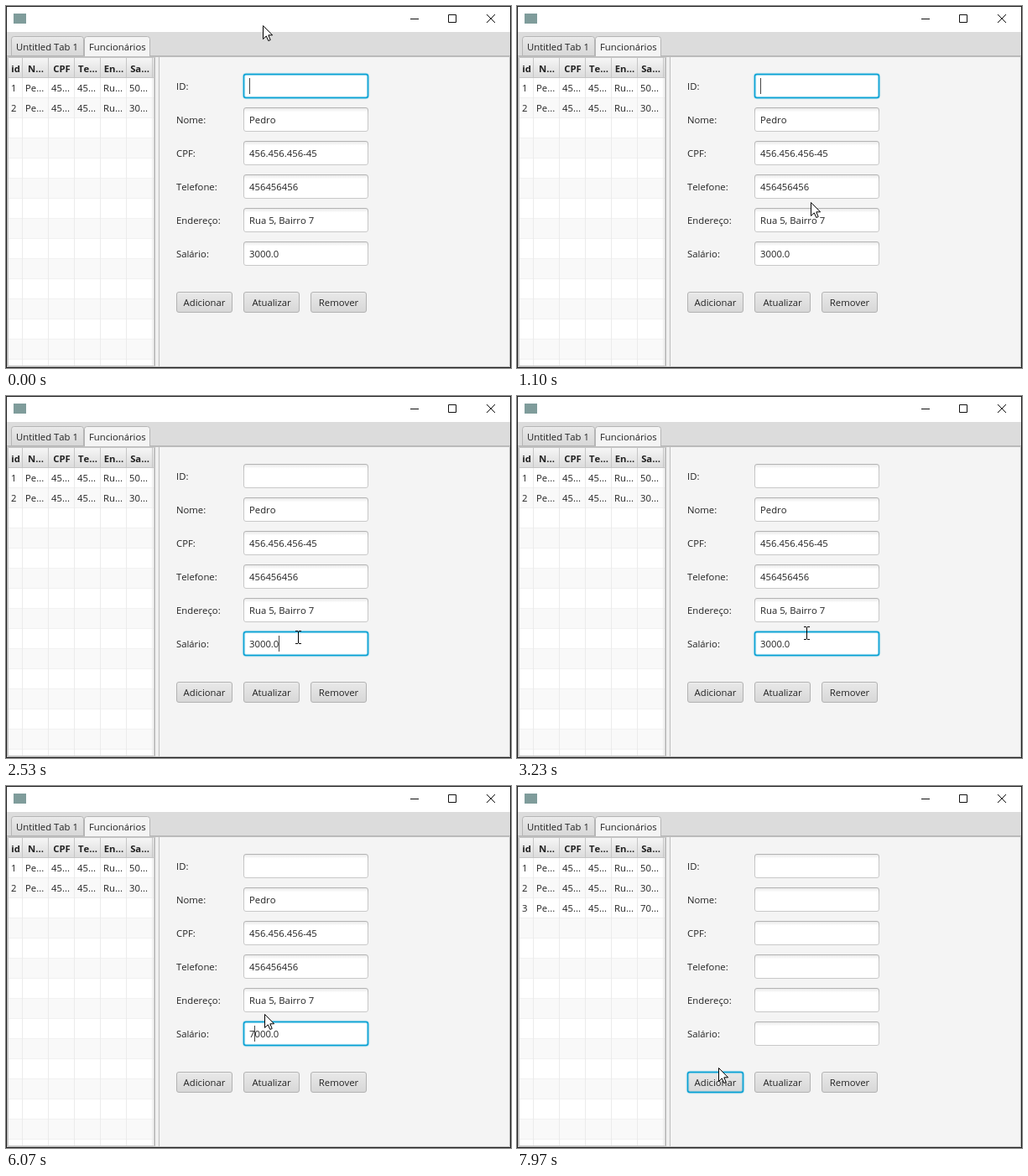
An HTML page for the animation above (8000 ms loop, 602 px wide and 432 px high).

```html
<!DOCTYPE html>
<html lang="pt">
<head>
<meta charset="utf-8">
<title>Funcionários</title>
<style>
  html, body { margin: 0; width: 100%; height: 100%; overflow: hidden; }
  svg { display: block; width: 100%; height: 100%; }
  text { font: 11.3px "Open Sans", "Noto Sans", sans-serif; font-kerning: none; fill: #222; white-space: pre; }
  .bold { font-weight: 700; }
  .mid { text-anchor: middle; }
  .box { fill: url(#inset); stroke: url(#edge); }
  .btn { fill: url(#btn); stroke: #b2b2b2; }
  .btn.hover { fill: url(#hover); }
  .btn.down { fill: url(#down); }
  .ring { fill: none; stroke: #039ed3; stroke-opacity: .25; stroke-width: 3.6; }
  .focus .box, .focus .btn { stroke: #039ed3; stroke-width: 1.4; }
  .focus .box { fill: #fff; }
  g:not(.focus) > .ring { display: none; }
</style>
</head>
<body>
<svg id="stage" viewBox="0 0 602 432" preserveAspectRatio="none">
  <defs>
    <linearGradient id="edge" x2="0" y2="1"><stop stop-color="#b3b3b3"/><stop offset=".3" stop-color="#c6c6c6"/><stop offset="1" stop-color="#c8c8c8"/></linearGradient>
    <linearGradient id="inset" x2="0" y2="1"><stop stop-color="#e8e8e8"/><stop offset=".18" stop-color="#fff"/></linearGradient>
    <linearGradient id="btn" x2="0" y2="1"><stop stop-color="#f0f0f0"/><stop offset=".1" stop-color="#e7e7e7"/><stop offset="1" stop-color="#d7d7d7"/></linearGradient>
    <linearGradient id="hover" x2="0" y2="1"><stop stop-color="#f8f8f8"/><stop offset="1" stop-color="#e3e3e3"/></linearGradient>
    <linearGradient id="down" x2="0" y2="1"><stop stop-color="#d8d8d8"/><stop offset="1" stop-color="#c8c8c8"/></linearGradient>
    <linearGradient id="head" x2="0" y2="1"><stop stop-color="#f6f6f6"/><stop offset="1" stop-color="#dcdcdc"/></linearGradient>
  </defs>

  <!-- window frame and title bar -->
  <rect width="602" height="432" fill="#1f1f1f"/>
  <rect x="1" y="1" width="600" height="430" fill="#f4f4f4"/>
  <rect x="1" y="1" width="600" height="30" fill="#fff"/>
  <rect x="9" y="9" width="15" height="12" fill="#7f9c9b"/>
  <path d="M482 15.5h10M527.5 10.5h9v9h-9zM573 10l10 10M583 10l-10 10" fill="none" stroke="#111"/>

  <!-- tabs -->
  <rect x="1" y="31" width="600" height="29" fill="#dcdcdc"/>
  <path d="M1 59.5H601" stroke="#b8b8b8"/>
  <path d="M6.5 59.5V39.5q0-3 3-3H89.5q3 0 3 3V59.5z" fill="url(#btn)" stroke="#b5b5b5"/>
  <path d="M93.5 60V39.5q0-3 3-3H168.5q3 0 3 3V60" fill="#f4f4f4" stroke="#b5b5b5"/>
  <text x="12" y="53">Untitled Tab 1</text>
  <text x="99" y="53">Funcionários</text>

  <g id="table"></g>

  <!-- split pane -->
  <rect x="177" y="61" width="6" height="369" fill="#f0f0f0"/>
  <path d="M1.5 60.5H600.5V430.5H1.5zM177.5 61V430M182.5 61V430" fill="none" stroke="#bdbdbd"/>

  <g id="form"></g>
  <path id="caret" d="M.5 0v19" stroke="#444"/>
  <path id="arrow" d="M.5 .5V16.5L4.3 12.9 6.8 18.5 9.2 17.5 6.8 11.8H11.6z" fill="#fff" stroke="#000"/>
  <path id="beam" d="M-3 -7.5h3M1 -7.5h3M.5 -7V7M-3 7.5h3M1 7.5h3" fill="none" stroke="#000"/>
</svg>
<script>
const LOOP = 8000;
const $ = id => document.getElementById(id);

function add(parent, tag, attrs, label) {
  const el = document.createElementNS("http://www.w3.org/2000/svg", tag);
  for (const k in attrs) el.setAttribute(k, attrs[k]);
  if (label) el.textContent = label;
  return parent.appendChild(el);
}

// Table
const edges = [3, 20, 51, 82, 113, 144, 175];
const heads = ["id", "N...", "CPF", "Te...", "En...", "Sa..."];
const table = $("table");

function addRow(n, salary) {
  const row = add(table, "g", {});
  [n, "Pe...", "45...", "45...", "Ru...", salary].forEach((label, i) =>
    add(row, "text", { x: edges[i] + 3, y: 78 + n * 24 }, String(label)));
  return row;
}

add(table, "rect", { x: 2, y: 61, width: 175, height: 369, fill: "#fff" });
for (let y = 110; y < 430; y += 48)
  add(table, "rect", { x: 2, y, width: 174, height: Math.min(24, 430 - y), fill: "#f9f9f9" });
for (let y = 109.5; y < 430; y += 24)
  add(table, "path", { d: `M2 ${y}H176`, stroke: "#f1f1f1" });
add(table, "rect", { x: 2, y: 62, width: 174, height: 23, fill: "url(#head)" });
heads.forEach((label, i) => {
  const right = edges[i + 1];
  add(table, "path", { d: `M${right - .5} 86V430`, stroke: "#ebebeb" });
  add(table, "path", { d: `M${right - .5} 62V85`, stroke: "#c6c6c6" });
  add(table, "text", { x: (edges[i] + right) / 2, y: 79, class: "bold mid" }, label);
});
add(table, "path", { d: "M2 85.5H176M2.5 61.5H176.5V429.5H2.5z", fill: "none", stroke: "#c6c6c6" });
addRow(1, "50...");
addRow(2, "30...");
const newRow = addRow(3, "70...");

// Form
const values = {
  "ID:": "", "Nome:": "Pedro", "CPF:": "456.456.456-45",
  "Telefone:": "456456456", "Endereço:": "Rua 5, Bairro 7", "Salário:": "3000.0"
};

// A bordered control with its focus ring
function addControl(kind, x, y, width, height) {
  const g = add($("form"), "g", {});
  const shape = { x: x + .5, y: y + .5, width, height, rx: 2.5 };
  const face = add(g, "rect", { ...shape, class: kind });
  add(g, "rect", { ...shape, class: "ring" });
  return { g, face };
}

const fields = Object.entries(values).map(([label, value], i) => {
  const y = 81 + i * 40;
  add($("form"), "text", { x: 203, y: y + 19 }, label);
  const { g } = addControl("box", 283, y, 148, 28);
  return { g, y, value, text: add(g, "text", { x: 290, y: y + 19 }, value) };
});
const buttons = ["Adicionar", "Atualizar", "Remover"].map((label, i) => {
  const x = 203 + i * 80;
  const button = addControl("btn", x, 341, 66, 24);
  add(button.g, "text", { x: x + 33.5, y: 358, class: "mid" }, label);
  return button;
});

// Pointer route: time, x, y
const route = [
  [0, 306, 23], [130, 306, 23], [930, 357, 209], [970, 357, 209], [1100, 350, 234],
  [1500, 354, 309], [1729, 354, 309], [1730, 355, 309], [1870, 355, 309],
  [1970, 346, 305], [2200, 346, 300], [2630, 348, 285], [2730, 348, 285],
  [2970, 345, 283], [5340, 345, 283], [5370, 345, 284], [5500, 266, 209],
  [5700, 266, 209], [6020, 317, 262], [6470, 241, 349], [7600, 241, 349],
  [7630, 242, 351], [7900, 242, 351], [7970, 240, 336], [LOOP, 240, 336]
];
const SELECT = 2200, HOME = 2730, RIGHT = 3830, ERASE = 4770, TYPE = 4870, PRESS = 7570, RELEASE = 7700;

function pointer(t) {
  const i = route.findIndex(p => p[0] > t);
  const [t0, x0, y0] = route[i - 1], [t1, x1, y1] = route[i];
  const k = (t - t0) / (t1 - t0);
  return [Math.round(x0 + (x1 - x0) * k), Math.round(y0 + (y1 - y0) * k)];
}

// Each caret move restarts its blink: time, x
const carets = [[-100, 290], [SELECT, 325], [HOME, 290], [RIGHT, 296], [ERASE, 290], [TYPE, 296]];

function salary(t) {
  if (t < ERASE) return "3000.0";
  return t < TYPE ? "000.0" : "7000.0";
}

const show = (el, on) => el.style.display = on ? "" : "none";
const place = (el, x, y) => el.setAttribute("transform", `translate(${x} ${y})`);

function draw(t) {
  const done = t >= RELEASE;
  const focus = t < SELECT ? 0 : t < PRESS ? 5 : -1;
  fields.forEach((f, i) => {
    f.text.textContent = done ? "" : i === 5 ? salary(t) : f.value;
    f.g.classList.toggle("focus", i === focus);
  });
  show(newRow, done);

  const [since, caretX] = carets.filter(c => c[0] <= t).pop();
  show($("caret"), focus >= 0 && Math.floor((t - since) / 500) % 2 === 0);
  if (focus >= 0) place($("caret"), caretX, fields[focus].y + 5);

  const [x, y] = pointer(t);
  const inField = x >= 283 && x < 432 && fields.some(f => y >= f.y && y < f.y + 29);
  show($("beam"), inField);
  show($("arrow"), !inField);
  place($(inField ? "beam" : "arrow"), x, y);

  const { g, face } = buttons[0];
  g.classList.toggle("focus", t >= PRESS);
  face.classList.toggle("hover", x >= 203 && x < 270 && y >= 341 && y < 366);
  face.classList.toggle("down", t >= PRESS && t < RELEASE);
}

const start = performance.now();
function tick() {
  draw((performance.now() - start) % LOOP);
  requestAnimationFrame(tick);
}
tick();
</script>
</body>
</html>
```
